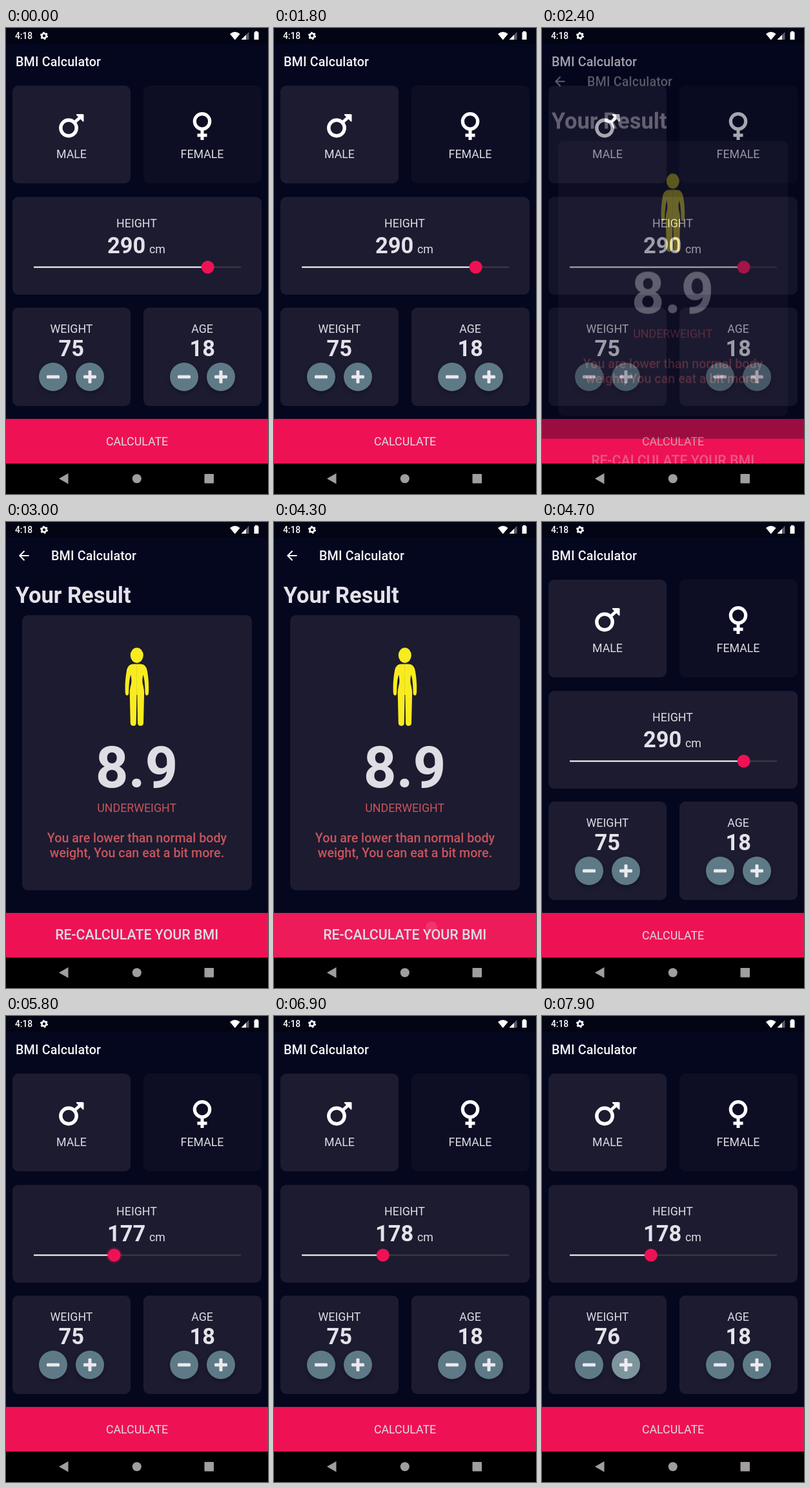
An HTML page that plays this animation: 406x720 px, repeating every 8 s.

```html
<!DOCTYPE html>
<html lang="en">
<head>
<meta charset="utf-8">
<title>BMI Calculator</title>
<style>
  html, body { margin: 0; width: 100%; height: 100%; overflow: hidden; background: #000; }
  svg { display: block; width: 406px; height: 720px; }
  text { font-family: Roboto, sans-serif; font-size: 17.8px; fill: #dedde4; }
  .mid { text-anchor: middle; }
  .title { font-size: 19.7px; font-weight: 500; letter-spacing: .15px; fill: #f6f4f8; }
  .big { font-size: 34.5px; font-weight: 700; fill: #e4e2e9; }
  .bg { fill: #05071e; }
  .card { fill: #1d1b30; }
  .idle { fill: #0d0e24; }
  .pink { fill: #ee1254; }
  .white { fill: #fff; }
  .line { fill: none; stroke: #fff; }
  .round { filter: drop-shadow(0 3px 3px rgba(0, 0, 0, .3)); }

  #result, #result > g, .wave, .glow, #tap { animation: 8s linear infinite; }
  #result { animation-name: fade; }
  #result > g { animation-name: rise; }
  .wave { animation-name: wave; transform-origin: 244px 626px; }
  .glow { animation-name: glow; }
  #tap { animation-name: tap; transform-origin: 130px 539px; }

  /* page push at 2.24 s, pop at 4.36 s, 0.3 s each */
  @keyframes fade {
    0% { opacity: 0; }
    28% { opacity: 0; animation-timing-function: cubic-bezier(.42, 0, 1, 1); }
    31.75% { opacity: 1; }
    54.5% { opacity: 1; animation-timing-function: cubic-bezier(0, 0, .58, 1); }
    58.25%, 100% { opacity: 0; }
  }
  @keyframes rise {
    0% { transform: translateY(168px); }
    28% { transform: translateY(168px); animation-timing-function: cubic-bezier(.4, 0, .2, 1); }
    31.75% { transform: translateY(0); }
    54.5% { transform: translateY(0); animation-timing-function: cubic-bezier(.8, 0, .6, 1); }
    58.25%, 100% { transform: translateY(168px); }
  }
  @keyframes wave {
    0%, 52.8% { transform: scale(0); opacity: .12; }
    53.75% { transform: scale(1); opacity: .12; }
    58.25%, 100% { transform: scale(26); opacity: 0; }
  }
  @keyframes glow {
    0%, 52.8% { opacity: 0; }
    53.75%, 55% { opacity: .04; }
    58.25%, 100% { opacity: 0; }
  }
  @keyframes tap {
    0%, 95% { transform: scale(0); opacity: .2; }
    98%, 100% { transform: scale(1); opacity: .2; }
  }
</style>
</head>
<body>
<svg viewBox="0 0 406 720">
  <defs>
    <g id="minus">
      <circle class="round" r="22" fill="#5e7a86"/>
      <rect x="-10" y="-2.5" width="20" height="5" rx="1.5" fill="#ece9ee"/>
    </g>
    <g id="plus">
      <use href="#minus"/>
      <rect x="-2.5" y="-10" width="5" height="20" rx="1.5" fill="#ece9ee"/>
    </g>
    <path id="half" d="M202.9 219.5H208C215 219.5 218 224 219 231C221 243 221.5 252 221 264Q220.5 268 218.2 268
      Q216 268 215.6 264C215.5 252 214.5 242 212.6 236C211 243 211 247 212.3 252C213.8 258 214.3 262 214 268
      L213 311Q212.5 315 208.3 315Q204.4 315 204.1 311L203.4 267H202.9Z"/>
    <clipPath id="bar"><rect y="604" width="406" height="69"/></clipPath>
  </defs>

  <rect class="bg" width="406" height="720"/>

  <g id="home">
    <text class="title" x="15" y="59">BMI Calculator</text>

    <rect class="card" x="10" y="89" width="183" height="151" rx="9"/>
    <circle class="line" cx="97" cy="154.5" r="12.2" stroke-width="5.4"/>
    <path class="line" d="M105.5 146.5L116 137" stroke-width="5"/>
    <path class="white" d="M109.5 133H119Q120.5 133 120.5 134.5V144Q120 145 119 144.5L109 134.5Q108.5 133.2 109.5 133Z"/>
    <text class="mid" x="101.5" y="201">MALE</text>

    <rect class="idle" x="213" y="89" width="183" height="151" rx="9"/>
    <circle class="line" cx="304" cy="144.3" r="11.7" stroke-width="5.2"/>
    <path class="line" d="M304 156V173M296.5 165.7H311.5" stroke-width="5"/>
    <text class="mid" x="304" y="201">FEMALE</text>

    <rect class="card" x="10" y="261" width="386" height="151" rx="9"/>
    <text class="mid" x="202.5" y="307.5">HEIGHT</text>
    <text class="big" id="height" x="157" y="347.5">290</text>
    <text x="222" y="348">cm</text>
    <rect x="43" y="368.5" width="321" height="2" fill="#403c42"/>
    <rect id="fill" class="white" x="43" y="368.5" width="269" height="2"/>
    <g id="thumb" class="pink">
      <circle id="halo" cy="369.5" r="12.5" opacity="0"/>
      <circle cy="369.5" r="10"/>
    </g>

    <rect class="card" x="10" y="432" width="183" height="152" rx="9"/>
    <text class="mid" x="101.5" y="470.5">WEIGHT</text>
    <text class="big mid" id="weight" x="101.3" y="506.5">75</text>
    <use href="#minus" x="73" y="539"/>
    <use href="#plus" x="130" y="539"/>
    <circle id="tap" class="white" cx="130" cy="539" r="22"/>

    <rect class="card" x="213" y="432" width="183" height="152" rx="9"/>
    <text class="mid" x="304" y="470.5">AGE</text>
    <text class="big mid" x="304.3" y="506.5">18</text>
    <use href="#minus" x="276" y="539"/>
    <use href="#plus" x="333" y="539"/>

    <rect class="pink" y="604" width="406" height="69"/>
    <text class="mid" x="203" y="644.5">CALCULATE</text>
  </g>

  <g id="result"><g>
    <rect class="bg" width="406" height="673"/>
    <path class="line" d="M35.5 52H22M28.5 44.8L21.3 52L28.5 59.2" stroke-width="2"/>
    <text class="title" x="70" y="59">BMI Calculator</text>
    <text class="big" x="14.8" y="125">Your Result</text>
    <rect class="card" x="25" y="144" width="356" height="425" rx="9"/>
    <g fill="#f8ec20">
      <ellipse cx="202.8" cy="206" rx="10" ry="11.7"/>
      <use href="#half"/>
      <use href="#half" transform="matrix(-1 0 0 1 405.8 0)"/>
    </g>
    <text class="mid" x="202.7" y="410" style="font-size:88.8px;font-weight:700">8.9</text>
    <g class="mid">
      <text x="202.7" y="447.5" style="fill:#c8545c">UNDERWEIGHT</text>
      <text x="203" y="495" style="fill:#c8545c;font-size:19.7px;font-weight:500">You are lower than normal body</text>
      <text x="203" y="517.7" style="fill:#c8545c;font-size:19.7px;font-weight:500">weight, You can eat a bit more.</text>
    </g>
    <rect class="pink" y="604" width="406" height="69"/>
    <g clip-path="url(#bar)" class="white">
      <rect class="glow" y="604" width="406" height="69"/>
      <circle class="wave" cx="244" cy="626" r="8"/>
    </g>
    <text class="mid" x="202.7" y="645.3" style="font-size:21.4px;font-weight:500">RE-CALCULATE YOUR BMI</text>
  </g></g>

  <g id="status" class="white">
    <rect width="406" height="24" fill="#000" opacity=".3"/>
    <text x="14" y="17" style="font-size:13.8px;font-weight:500;fill:#fff">4:18</text>
    <circle class="line" cx="59" cy="12" r="3.5" stroke-width="2.6"/>
    <circle class="line" cx="59" cy="12" r="5.2" stroke-width="1.8" stroke-dasharray="2.7 2.745"/>
    <path d="M347 9.3Q354.8 2.8 362.6 9.3L354.8 18.5Z"/>
    <path d="M376.5 6V18H364.5Z" opacity=".35"/>
    <path d="M372 10.5V18H364.5Z"/>
    <path d="M386 6.5V5H390V6.5H391.5V18H384.5V6.5Z"/>
  </g>

  <g id="nav" fill="#a19da1">
    <rect y="673" width="406" height="47" fill="#000"/>
    <path d="M82 696.3L96.5 688V704.6Z"/>
    <circle cx="202.8" cy="696.3" r="7"/>
    <rect x="307.5" y="689" width="14.5" height="14.5" rx="1"/>
  </g>
</svg>
<script>
  const [height, weight, fill, thumb, halo] =
    ['height', 'weight', 'fill', 'thumb', 'halo'].map(id => document.getElementById(id));
  const LOOP = 8000, LEFT = 43, TRACK = 321, MIN = 80, RANGE = 250;
  let start;

  const smooth = x => { x = Math.min(1, Math.max(0, x)); return x * x * (3 - 2 * x); };

  function draw(t) {
    const cm = t >= 6000 ? 178 : Math.round(290 - 113 * smooth((t - 5000) / 780));
    const w = (cm - MIN) / RANGE * TRACK;
    height.textContent = cm;
    fill.setAttribute('width', w);
    thumb.setAttribute('transform', `translate(${LEFT + w})`);
    halo.setAttribute('opacity', t >= 5000 && t < 6050 ? .2 : 0);
    weight.textContent = t >= 7700 ? 76 : 75;
  }

  function tick(now) {
    start ??= now;
    draw((now - start) % LOOP);
    requestAnimationFrame(tick);
  }
  draw(0);
  requestAnimationFrame(tick);
</script>
</body>
</html>
```
